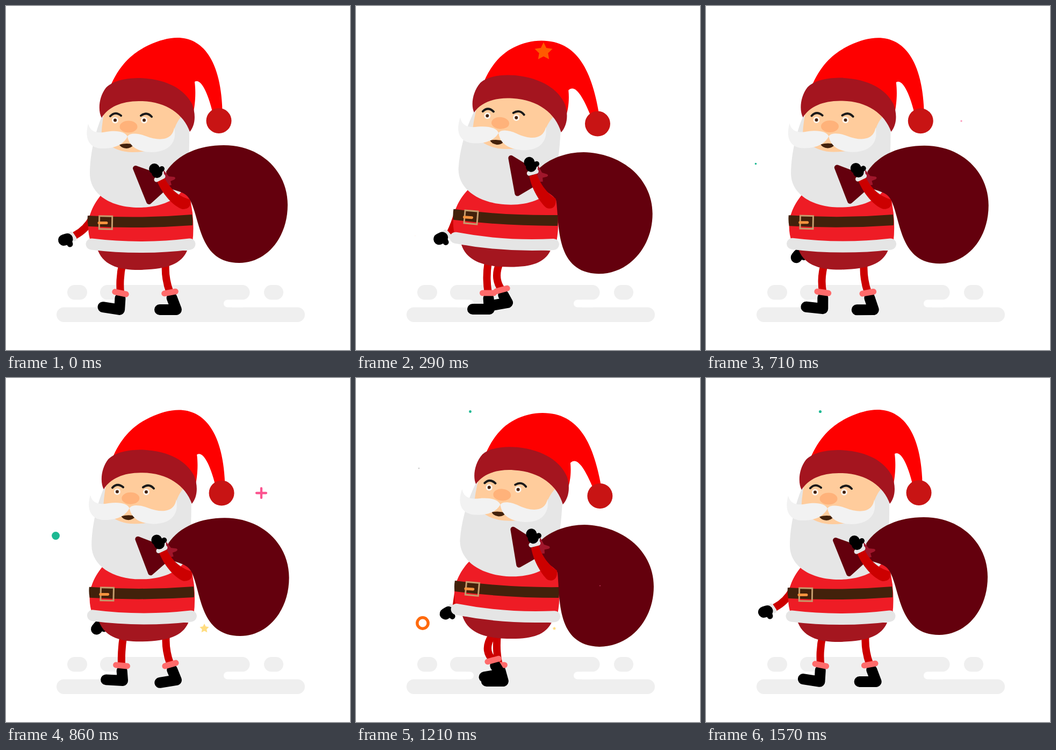
An HTML page that plays this animation: 640x640 px, repeating every 1640 ms.

```html
<!DOCTYPE html>
<html lang="en">
<head>
<meta charset="utf-8">
<title>Walking Santa</title>
<style>
  html, body { margin: 0; height: 100%; overflow: hidden; background: #fff; }
  svg { display: block; width: 100vw; height: 100vh; }
  .line { fill: none; stroke-linecap: round; stroke-linejoin: round; }
</style>
</head>
<body>
<svg viewBox="0 0 640 640">
  <g fill="#efefef">
    <rect x="114" y="519" width="37" height="27.5" rx="13.7"/>
    <rect x="480" y="519" width="36" height="27.5" rx="13.7"/>
    <rect x="175" y="519" width="278.500" height="27.5" rx="13.7"/>
    <rect x="94" y="560.500" width="462" height="27.5" rx="13.7"/>
    <rect x="205" y="540" width="215" height="26"/>
  </g>
  <path class="line" stroke="#fff" stroke-width="14" d="M190 553.500H212M412 553.500H440"/>
  <g id="scene"></g>
</svg>
<script>
const LOOP = 1640;
const scene = document.getElementById('scene');

const lerp = (a, b, k) => a + (b - a) * k;
const swing = x => (1 - Math.cos(Math.PI * x)) / 2;
const line = (d, color, width, more = '') =>
  `<path class="line" d="${d}" stroke="${color}" stroke-width="${width}" ${more}/>`;
const fill = (d, color) => `<path d="${d}" fill="${color}"/>`;
const dot = (x, y, r, color) => `<circle cx="${x}" cy="${y}" r="${r}" fill="${color}"/>`;

// Blend two paths that share the same commands.
function morph(a, b, k) {
  const ends = b.match(/\d+/g);
  let i = 0;
  return a.replace(/\d+/g, n => lerp(+n, +ends[i++], k).toFixed(2));
}

// Times of the walk's quarter steps; the rest of the loop is a short hold.
const STEPS = [0, 355, 775, 1225, 1575];
function walkPhase(t) {
  const i = STEPS.findIndex((s, n) => n && t < s);
  return i < 0 ? 4 : i - 1 + (t - STEPS[i - 1]) / (STEPS[i] - STEPS[i - 1]);
}

// phase, cuff x, y, tilt, heel x, y, sole tilt
const STRIDE = [
  [0, 213, 534, 12, 211, 565, 9], [.19, 215, 535, 5, 217, 563, 3],
  [.82, 246, 534, 0, 248, 564, 0], [.97, 266, 534, 0, 274, 564, 0],
  [1.39, 285, 535, -10, 296, 564, -2], [1.51, 293, 534, -10, 300, 565, -2],
  [2, 305, 533, -10, 317, 565, 0], [2.19, 306, 533, -16, 317, 562, -9],
  [2.82, 271, 528, -15, 282, 552, -10], [2.97, 255, 525, -15, 269, 551, -10],
  [3.39, 235, 528, -4, 242, 555, -6], [3.51, 227, 530, 0, 231, 559, 0],
  [4, 213, 534, 12, 211, 565, 9]
];

function leg(phase) {
  const i = Math.max(1, STRIDE.findIndex(s => s[0] > phase));
  const a = STRIDE[i - 1], b = STRIDE[i];
  const k = (phase - a[0]) / (b[0] - a[0]);
  const [, x, y, tilt, hx, hy, sole] = a.map((v, n) => lerp(v, b[n], k));
  const hip = 257 + .87 * (x - 259);
  const knee = (hip + x) / 2 - 3 - (535 - y) * 1.6;
  const r = sole * Math.PI / 180;
  return line(`M${hip} 478Q${knee} 506 ${x} ${y}`, '#cc0000', 14) +
    line(`M${x + (hx - x) * .3} ${y + 10}L${hx} ${hy}l${-31 * Math.cos(r)} ${-31 * Math.sin(r)}`, '#000', 20) +
    line(`M${x - 10.5} ${y}h21`, '#ff6b6b', 11, `transform="rotate(${tilt} ${x} ${y})"`);
}

function backArm(s) {
  return line(`M${128 + 57 * s} ${427 + 25 * s}Q${149 + 20 * s} ${416 + 6 * s} 161 394`, '#cc0000', 14) +
    `<g transform="translate(${59 * s} ${31 * s}) rotate(${-35 * s} 112 435)">` +
    line('M121 424L127 433', '#e6e6e6', 9) +
    line('M107.500 435.500L114 433.500', '#000', 21) + line('M117 437L119 443', '#000', 11) + '</g>';
}

const torso =
  fill('M171 455C183 485 215 491 246 491C298 490 326 481 337 455Z', '#a4161f') +
  fill('M180 348C160 370 152 395 153 412Q153 425 158 440L347 439Q350 415 347 385L340 340Z', '#ee1c25') +
  fill('M152 390Q250 396 346 388Q348 398 347 408Q250 415 153 410Q151 400 152 390Z', '#42210b') +
  '<rect x="173.500" y="391" width="24" height="24" fill="none" stroke="#c69c6d" stroke-width="3" transform="rotate(1 185 403)"/>' +
  line('M173 403.500H187', '#f7933e', 5) +
  line('M159 443Q250 454 342 443', '#e5e5e5', 21);

const face =
  fill('M178 206C166 235 156 275 156 312C156 350 195 375 247 375C285 375 318 362 330 340C342 300 341 260 341 230Q338 212 327 204Z', '#e6e6e6') +
  fill('M181 205Q178 225 177 245Q200 272 235 272Q285 272 308 245Q316 215 328 204C320 160 185 160 181 205Z', '#ffcc9c') +
  '<ellipse cx="228" cy="224.500" rx="16.500" ry="11" fill="#ffb27a"/>' +
  fill('M211 258Q225 254 238 258Q232 265 224 265Q214 264 211 258Z', '#42210b') +
  fill('M153 219C157 236 172 237 187 234C207 231 222 234 226 243C217 261 196 266 175 265C150 262 147 240 153 219Z' +
    'M226 243C230 236 244 236 260 242C286 252 310 250 313 226C319 255 302 272 270 272C245 271 230 262 226 243Z', '#f2f2f2');

const brows = line('M194 205Q203 195 214 204M251 204Q262 196 271 206', '#1a1a1a', 4);
const eyes = [203, 257].map(x => dot(x, 212.5, 6, '#fff5ec') + dot(x, 212.5, 3, '#42210b')).join('');

const hatBand = fill('M178 208C171 196 172 170 186 152C200 138 225 134 250 134C300 136 332 155 346 182' +
  'C354 202 352 222 342 234C330 200 295 176 247 177C215 177 190 188 178 208Z', '#a4151f');

const HAT = [
  'M193 152C212 105 240 85 265 73C285 64 302 59 319 59C362 59 402 95 403 205L386 205C376 160 362 134 351 141C354 165 351 185 349 197L250 160Z',
  'M241 142C255 108 275 88 295 78C312 69 330 65 347 65C416 65 443 122 458 210L444 212C427 170 412 145 399 158C401 178 398 195 394 206L290 155Z'
];
const SACK = [
  'M298 308C320 275 360 259 405 259C475 259 524 308 524 370C524 432 484 478 434 478C360 478 362 400 343 362C335 345 318 345 300 338Z',
  'M342 304C362 284 395 273 425 273C500 275 554 325 554 388C554 450 510 500 453 500C372 498 380 410 375 362C370 350 350 345 342 330Z'
];
const SLEEVE = [
  'M281 326C290 348 310 372 328 378C340 378 346 372 342 360C325 355 308 345 295 320Z',
  'M326 316C330 340 345 365 356 375C366 380 376 374 374 358C360 350 345 330 340 311Z'
];

const sackNeck = line('M241 302L266 364L308 326Z', '#64000d', 10, 'style="fill:#64000d"') +
  fill('M293 305L303 317L313 318Q317 320 313 323L306 326L308 333L297 336Z', '#a0162b');
const frontHand = line('M280 323L292 317', '#e6e6e6', 9) +
  dot(276, 303, 10, '#000') + dot(281, 310, 10, '#000') + line('M281 310L290 303', '#000', 10);

const SHAPES = {
  dot: (x, y, r, c) => dot(x, y, r, c),
  ring: (x, y, r, c) => `<circle cx="${x}" cy="${y}" r="${r * .79}" fill="none" stroke="${c}" stroke-width="${r * .42}"/>`,
  plus: (x, y, r, c) => line(`M${x - r * .8} ${y}h${r * 1.6}M${x} ${y - r * .8}v${r * 1.6}`, c, r * .38),
  star: (x, y, r, c) => {
    const points = Array.from({ length: 10 }, (_, i) => {
      const a = i * Math.PI / 5, d = i % 2 ? r * .5 : r;
      return `${x + d * Math.sin(a)},${y - d * Math.cos(a)}`;
    });
    return `<polygon points="${points.join(' ')}" fill="${c}"/>`;
  }
};

// shape, x, y, full size, colour, start, duration
const POPS = [
  ['star', 349, 85, 17.5, '#ff5a00', 110, 390],
  ['ring', 110, 427.5, 13.5, '#ff6a0d', 288, 420],
  ['dot', 92.5, 293.5, 7.5, '#1db993', 680, 400],
  ['plus', 475, 214, 11.5, '#fb5590', 690, 400],
  ['star', 369, 466, 13.4, '#ffdd80', 740, 515],
  ['plus', 117, 168, 11.5, '#8c8c8c', 864, 360],
  ['ring', 124, 456, 13, '#ff6a0d', 1010, 440],
  ['dot', 212.5, 62.5, 7.7, '#1db993', 1165, 455],
  ['plus', 454, 386.5, 16, '#fb5590', 1203, 362]
];
const pop = (t, [shape, x, y, size, color, start, length]) => {
  const u = (t - start) / length;
  return u > 0 && u < 1 ? SHAPES[shape](x, y, size * Math.sin(Math.PI * u), color) : '';
};

function draw(now) {
  const t = now % LOOP;
  const phase = walkPhase(t);
  const lean = swing(phase);
  const body = content => `<g transform="rotate(${4.2 * lean} 347 820)">${content}</g>`;
  const sackTurn = content => `<g transform="rotate(${12.6 * lean} 359 525)">${content}</g>`;
  const blink = t >= 500 && t < 640;

  scene.innerHTML =
    leg((phase + 2) % 4) + leg(phase % 4) +
    body(backArm(swing(phase / 2)) + torso + face + brows + (blink ? '' : eyes)) +
    fill(morph(...HAT, lean), '#fe0000') +
    dot(lerp(396, 454, lean), lerp(213.5, 219.5, lean), 23.5, '#c81414') +
    body(hatBand) +
    fill(morph(...SACK, lean), '#64000d') +
    sackTurn(sackNeck) +
    fill(morph(...SLEEVE, lean), '#cc0000') +
    sackTurn(frontHand) +
    POPS.map(p => pop(t, p)).join('');
  requestAnimationFrame(draw);
}
draw(0);
</script>
</body>
</html>
```
